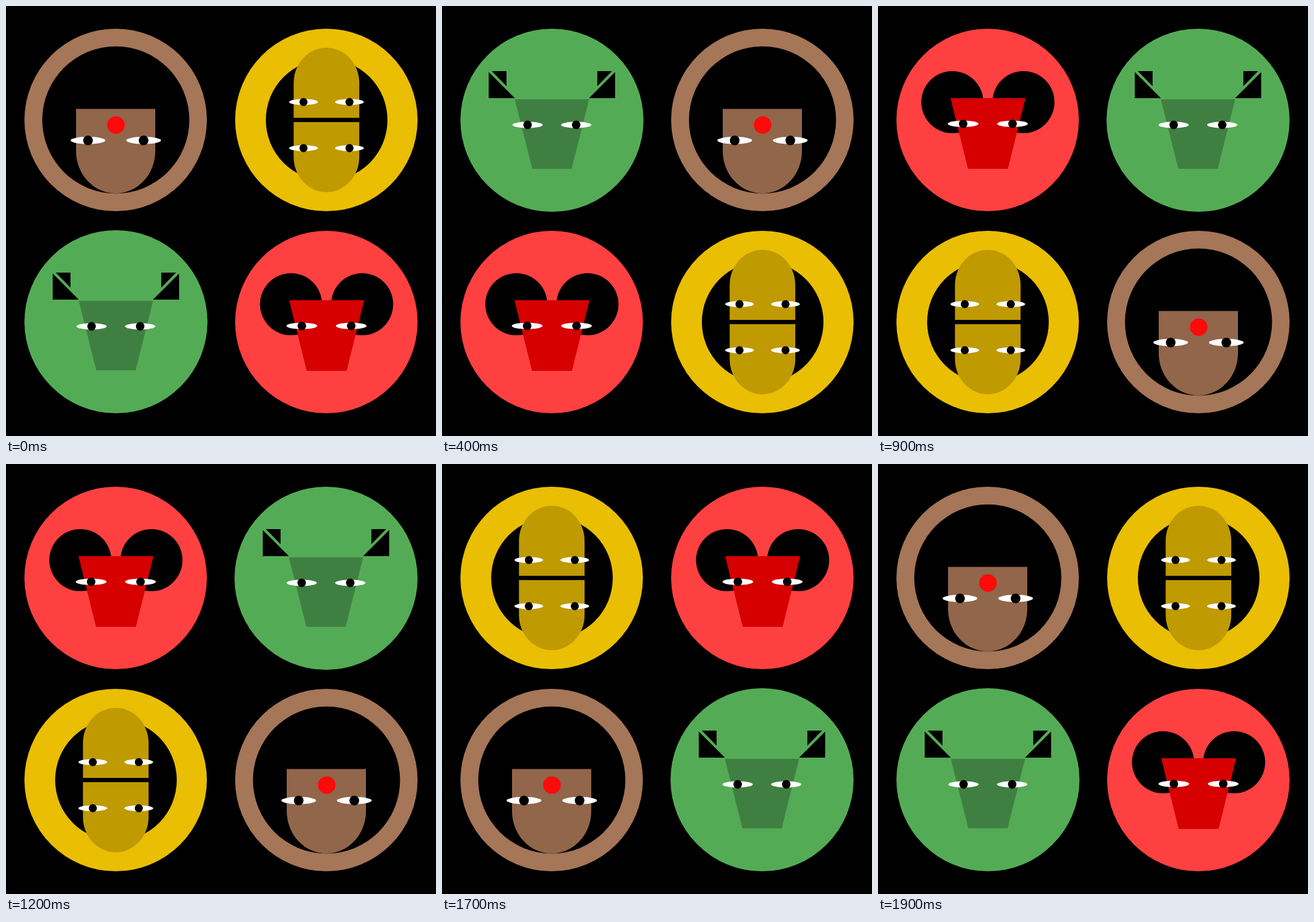
An HTML page for the animation above (2000 ms loop, 700 by 700 pixels).

```html
<!DOCTYPE html>
<html lang="en">
<head>
<meta charset="utf-8">
<title>Four faces</title>
<style>
  html, body { margin: 0; width: 100%; height: 100%; overflow: hidden; background: #000; }
  svg { display: block; width: 100vw; height: 100vh; }

  /* Every face steps clockwise through the four corners. */
  .face {
    --dx: 343px;
    --dy: 329px;
    animation: corners 2s step-end infinite;
  }
  .brown  { animation-delay: -0.1s; }
  .yellow { animation-delay: -0.6s; }
  .red    { animation-delay: -1.1s; }
  .green  { animation-delay: -1.6s; --dx: 342px; --dy: 328px; }

  @keyframes corners {
    0%, 100% { transform: translate(0, 0); }
    25% { transform: translate(var(--dx), 0); }
    50% { transform: translate(var(--dx), var(--dy)); }
    75% { transform: translate(0, var(--dy)); }
  }
</style>
</head>
<body>
<svg viewBox="0 0 700 700">
  <defs>
    <g id="eye">
      <ellipse rx="25" ry="5.2" fill="#fff"/>
      <circle r="7"/>
    </g>
    <g id="yellow-eyes">
      <use href="#eye" transform="translate(141.3 0) scale(.935)"/>
      <use href="#eye" transform="translate(216.2 0) scale(.935)"/>
    </g>
    <path id="ear" d="M76 107.5 L118.5 150 H76 Z M81 106 H105 V130.5 Z"/>
  </defs>

  <g class="face brown">
    <circle cx="178.5" cy="185.5" r="148.5" fill="#a57658"/>
    <circle cx="178.75" cy="185.5" r="119.75"/>
    <path d="M114 167.5 H243 V236.2 A64.5 68.8 0 0 1 114 236.2 Z" fill="#91664b"/>
    <circle cx="179" cy="193.7" r="14.3" fill="#ff0a0a"/>
    <use href="#eye" transform="translate(133.5 218.8) scale(1.13)"/>
    <use href="#eye" transform="translate(224 218.8) scale(1.13)"/>
  </g>

  <g class="face yellow">
    <circle cx="178.5" cy="185.5" r="148.5" fill="#e9be03"/>
    <circle cx="179" cy="185.5" r="99"/>
    <path d="M125.3 182 V125 A53.4 57 0 0 1 232.1 125 V182 Z
             M125.3 189 V246 A53.4 57 0 0 0 232.1 246 V189 Z" fill="#bf9a00"/>
    <use href="#yellow-eyes" y="156.3"/>
    <use href="#yellow-eyes" y="231.4"/>
  </g>

  <g class="face red">
    <circle cx="178.5" cy="185.5" r="148.5" fill="#ff4040"/>
    <circle cx="121" cy="156.5" r="50.5"/>
    <circle cx="236.8" cy="156.5" r="50.5"/>
    <path d="M118 150 H240 L211.5 265 H146.5 Z" fill="#d60000"/>
    <use href="#eye" x="138.6" y="191.7"/>
    <use href="#eye" x="219" y="191.7"/>
  </g>

  <g class="face green">
    <circle cx="179" cy="186" r="149" fill="#54ab55"/>
    <use href="#ear"/>
    <use href="#ear" transform="translate(357.8 0) scale(-1 1)"/>
    <path d="M118.5 152 H239.4 L211 265 H147 Z" fill="#407f42"/>
    <use href="#eye" transform="translate(139.3 193.5) scale(.985)"/>
    <use href="#eye" transform="translate(218.4 193.5) scale(.985)"/>
  </g>
</svg>
</body>
</html>
```
